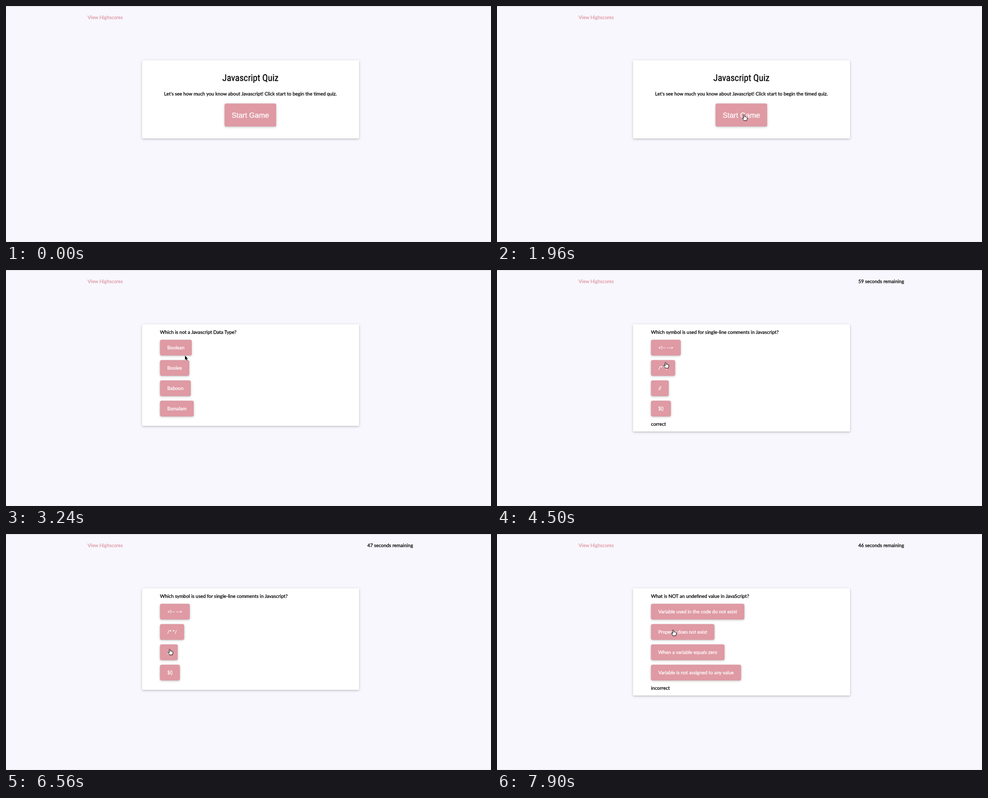
Write an HTML page with a canvas that moves like this. It is 1000 by 488 pixels and loops after 8000 ms.

```html
<!DOCTYPE html>
<html lang="en">
<head>
<meta charset="utf-8">
<title>Javascript Quiz</title>
<style>
  html, body { margin: 0; width: 100%; height: 100%; overflow: hidden; background: #f8f7fd; }
  canvas { display: block; width: 1000px; height: 488px; }
</style>
</head>
<body>
<canvas id="stage"></canvas>
<script>
const LOOP = 8000, W = 1000, H = 488;
const PINK = '#df9aa4', INK = '#000';
const BODY = '9.92px Lato, sans-serif';
const TITLE_FAMILY = '"Roboto Condensed", "Open Sans Condensed", Roboto, sans-serif';

const canvas = document.getElementById('stage');
const ctx = canvas.getContext('2d');
const ratio = window.devicePixelRatio || 1;
canvas.width = W * ratio;
canvas.height = H * ratio;
ctx.textRendering = 'geometricPrecision';

const arrow = new Path2D('M0 0V8.8L2 7L3.4 10.3L5 9.6L3.6 6.5H6.2Z');
const hand = new Path2D('M-1.6 1.3Q-1.6 .2-.5 .2Q.6 .2 .8 1.3L1.1 4.2Q2 3.4 3 4.3' +
  'Q4 3.8 4.8 4.8Q6.1 4.6 6.3 6L6 8.8Q5.4 10.4 5.2 12H-.6Q-1 10.8-2.2 9.4L-3.8 7.2Q-4 5.7-2.7 5.9L-1 7.2Z');

const questions = [
  { at: 2340, text: 'Which is not a Javascript Data Type?',
    answers: ['Boolean', 'Boolee', 'Baboon', 'Bamalam'] },
  { at: 3540, text: 'Which symbol is used for single-line comments in Javascript?',
    answers: ['<!-- -->', '/* */', '//', '$()'] },
  { at: 6700, text: 'What is NOT an undefined value in JavaScript?',
    answers: ['Variable used in the code do not exist', 'Property does not exist',
      'When a variable equals zero', 'Variable is not assigned to any value'] }
];
const feedback = [
  { at: 3540, text: 'correct' }, { at: 4960, text: 'incorrect' }, { at: 5940, text: '' },
  { at: 6700, text: 'correct' }, { at: 7480, text: '' }, { at: 7860, text: 'incorrect' }
];
const clock = [
  { at: 3540, left: 59 }, { at: 4740, left: 58 }, { at: 5940, left: 47 }, { at: 7140, left: 46 }
];

// Pointer path: time, x, y
const path = [
  [460, 328, 440], [660, 470, 205], [760, 535, 155], [860, 544, 188], [940, 521, 221],
  [1840, 521, 221], [2140, 493, 231],
  [2860, 493, 231], [3060, 415, 211], [3240, 369, 177], [3360, 366, 162],
  [4200, 366, 162], [4500, 348, 191], [4780, 346, 191],
  [4960, 346, 191], [5360, 390, 131],
  [5500, 390, 131], [6080, 557, 129],
  [6200, 557, 129], [6320, 338, 238],
  [6939, 338, 238], [6940, 447, 131],
  [7360, 447, 131], [7660, 363.5, 198.5]
];

const latest = (list, t) => list.filter(item => item.at <= t).pop();

function pointerAt(t) {
  if (t < path[0][0]) return null;
  const next = path.findIndex(key => key[0] > t);
  if (next < 0) return path[path.length - 1].slice(1);
  const [t0, x0, y0] = path[next - 1], [t1, x1, y1] = path[next];
  const k = (t - t0) / (t1 - t0);
  return [x0 + (x1 - x0) * k, y0 + (y1 - y0) * k];
}

// A hairline outline gives the text its slightly heavier look.
function write(text, x, y, { font = BODY, color = INK, align = 'left', outline = .28 } = {}) {
  ctx.font = font;
  ctx.fillStyle = ctx.strokeStyle = color;
  ctx.textAlign = align;
  ctx.lineJoin = 'round';
  ctx.lineWidth = outline;
  ctx.fillText(text, x, y);
  ctx.strokeText(text, x, y);
}

function box(x, y, w, h, radius, color, shadows) {
  ctx.fillStyle = color;
  for (const [offset, blur, alpha] of shadows) {
    ctx.save();
    ctx.shadowColor = `rgba(0,0,0,${alpha})`;
    ctx.shadowOffsetY = offset * ratio;
    ctx.shadowBlur = blur * ratio;
    ctx.beginPath();
    ctx.roundRect(x, y, w, h, radius);
    ctx.fill();
    ctx.restore();
  }
}

function button(x, y, w, h) {
  box(x, y, w, h, 3, PINK, [[1.3, 3.2, .16], [1.3, 6.3, .12]]);
  return { x, y, w, h };
}

function card(bottom) {
  box(280.5, 112.5, 447.5, bottom - 112.5, 1.5, '#fff', [[1.3, 3.2, .18], [1.3, 6.3, .12]]);
}

function drawIntro() {
  card(274);
  const title = 'Javascript Quiz';
  const font = size => `400 ${size}px ${TITLE_FAMILY}`;
  ctx.fontStretch = 'condensed';
  ctx.font = font(20);
  const size = Math.min(21.5, 20 * 116 / ctx.measureText(title).width);
  write(title, 504, 155.4, { font: font(size), align: 'center' });
  ctx.fontStretch = 'normal';
  write("Let's see how much you know about Javascript! Click start to begin the timed quiz.",
    504, 184.5, { align: 'center' });
  const start = button(450.8, 201.8, 106.2, 47.2);
  write('Start Game', 503.8, 230.5,
    { font: '15.1px "Liberation Sans", Arial, sans-serif', color: '#fff', align: 'center' });
  return [start];
}

function drawQuestion(question, note) {
  card(note ? 334 : 322.3);
  write(question.text, 317.5, 132.3);
  const buttons = question.answers.map((answer, i) => {
    const y = 144.6 + i * 42;
    ctx.font = BODY;
    const area = button(317.7, y, ctx.measureText(answer).width + 29.6, 31.9);
    write(answer, 332.4, y + 19.8, { color: '#fff' });
    return area;
  });
  if (note) write(note, 317.5, 322.3);
  return buttons;
}

function drawPointer([x, y], onButton) {
  const shape = onButton ? hand : arrow;
  ctx.save();
  ctx.translate(x, y);
  ctx.lineJoin = 'round';
  ctx.lineWidth = 1;
  ctx.strokeStyle = onButton ? '#000' : '#fff';
  ctx.fillStyle = onButton ? '#fff' : '#000';
  if (onButton) {
    ctx.fill(shape);
    ctx.stroke(shape);
  } else {
    ctx.stroke(shape);
    ctx.fill(shape);
  }
  ctx.restore();
}

function draw(t) {
  ctx.setTransform(ratio, 0, 0, ratio, 0, 0);
  ctx.fillStyle = '#f8f7fd';
  ctx.fillRect(0, 0, W, H);
  ctx.fillStyle = '#d2d1d7';
  ctx.fillRect(0, 0, W, 1);
  ctx.fillStyle = '#e9e8ee';
  ctx.fillRect(0, 487, W, 1);

  write('View Highscores', 168.3, 27.2, { color: PINK });
  const time = latest(clock, t);
  if (time) write(`${time.left} seconds remaining`, 839.3, 27.2, { align: 'right' });

  const question = latest(questions, t);
  const note = latest(feedback, t);
  const buttons = question ? drawQuestion(question, note && note.text) : drawIntro();

  const pointer = pointerAt(t);
  if (!pointer) return;
  const [x, y] = pointer;
  const onButton = t > 1840 && buttons.some(b =>
    x >= b.x && x <= b.x + b.w && y >= b.y && y <= b.y + b.h);
  drawPointer(pointer, onButton);
}

let origin;
function tick(now) {
  origin ??= now;
  draw((now - origin) % LOOP);
  requestAnimationFrame(tick);
}
requestAnimationFrame(tick);
</script>
</body>
</html>
```
